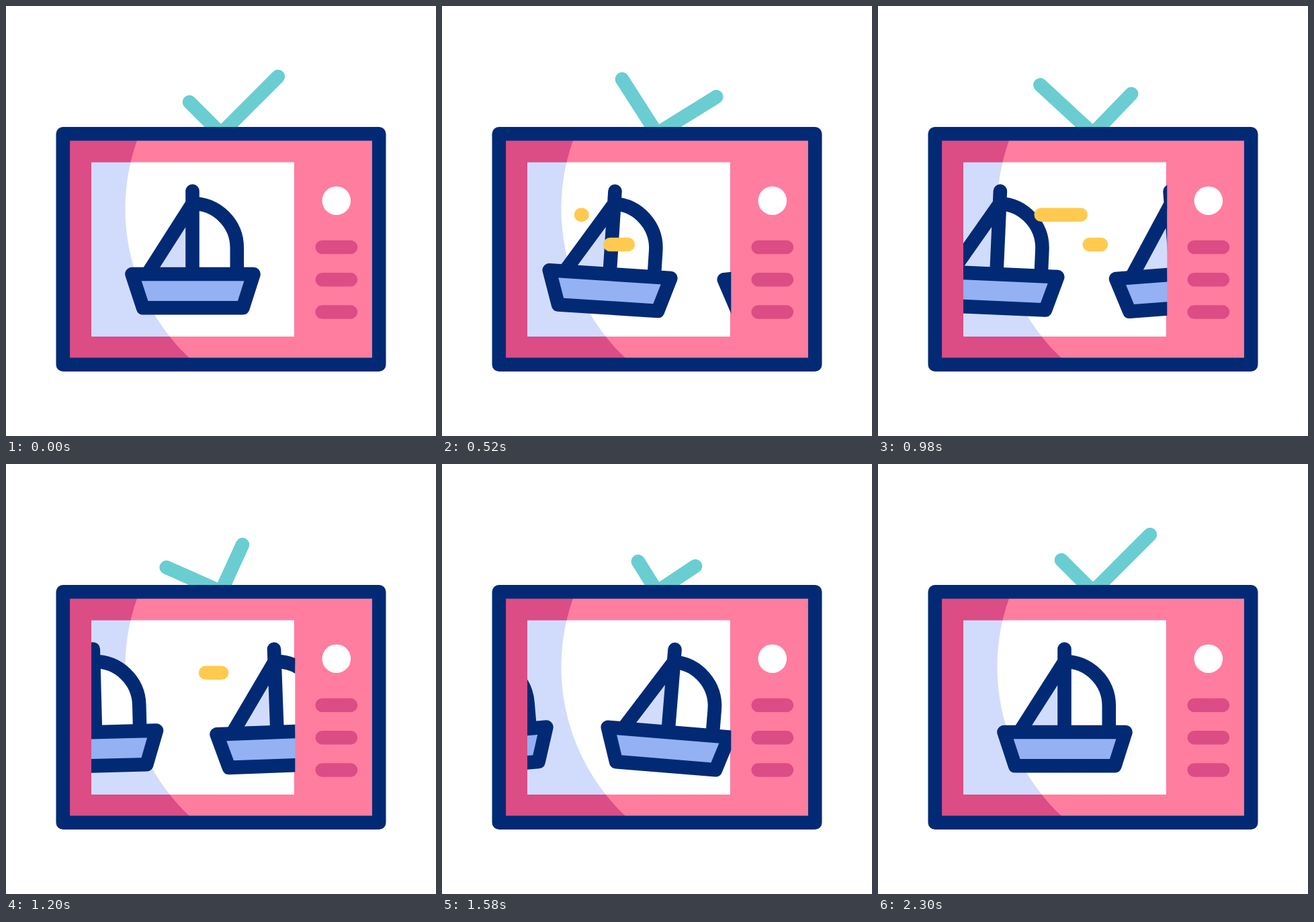
Write an HTML page that moves like this. It is 640 px wide and 640 px high and loops after 2400 ms.

```html
<!DOCTYPE html>
<html lang="en">
<head>
<meta charset="utf-8">
<title>Sailing on TV</title>
<style>
  html, body { margin: 0; width: 100%; height: 100%; overflow: hidden; background: #fff; }
  svg { display: block; width: 100vw; height: 100vh; }
  .line { fill: none; stroke-width: 20.6; stroke-linecap: round; stroke-linejoin: round; }
  .navy { stroke: #022a74; }
  .teal { stroke: #69cdd2; }
  .rose { stroke: #dc4c85; }
  .gold { stroke: #ffca4f; }
</style>
</head>
<body>
<svg viewBox="0 0 640 640">
  <defs>
    <clipPath id="screen"><rect x="127" y="233" width="303.3" height="259"/></clipPath>
    <clipPath id="lit"><circle cx="483.5" cy="302" r="306"/></clipPath>
    <g id="boat">
      <path d="M277.5 294 L210.5 399 H277.5Z" fill="#d1dcfd"/>
      <path d="M277.5 294 A66.3 66 0 0 1 343.8 360 V399 H277.5Z" fill="#fff"/>
      <path class="line navy" d="M277.5 275.5 V399 M277.5 294 L210.5 399 M277.5 294 A66.3 66 0 0 1 343.8 360 V399"/>
      <path class="line navy" d="M187.5 399 H368.5 L352.5 449.2 H204Z" style="fill:#93b1f3"/>
    </g>
  </defs>

  <line class="line teal" id="rodL" x1="320" y1="190"/>
  <line class="line teal" id="rodR" x1="320" y1="190"/>

  <rect x="85" y="190" width="470" height="344" fill="#dc4c85"/>
  <rect x="85" y="190" width="470" height="344" fill="#ff7d9f" clip-path="url(#lit)"/>
  <rect x="127" y="232.7" width="301.7" height="259.3" fill="#d1dcfd"/>
  <rect x="127" y="232.7" width="301.7" height="259.3" fill="#fff" clip-path="url(#lit)"/>
  <circle cx="491.8" cy="289.8" r="21.3" fill="#fff"/>
  <path class="line rose" d="M470.7 359 h42.2 M470.7 407.3 h42.2 M470.7 455.5 h42.2"/>

  <g clip-path="url(#screen)">
    <use id="boatA" href="#boat"/>
    <use id="boatB" href="#boat"/>
    <line class="line gold" id="gustLow" y1="355" y2="355"/>
    <line class="line gold" id="gustHigh" y1="310.7" y2="310.7"/>
  </g>

  <rect class="line navy" x="84.8" y="190.2" width="470.4" height="343.5"/>
</svg>
<script>
const LOOP = 2400;
const TIMES = [120, 280, 740, 1200, 1580, 1980, 2290];
const $ = id => document.getElementById(id);

// Smooth curve through the key poses, flat at every turning point
function track(...v) {
  const last = v.length - 1;
  const slope = i => (v[i + 1] - v[i]) / (TIMES[i + 1] - TIMES[i]);
  const tangent = v.map((_, i) => {
    if (i === 0 || i === last) return 0;
    const a = slope(i - 1), b = slope(i);
    return a * b > 0 ? 2 * a * b / (a + b) : 0;
  });
  return t => {
    if (t <= TIMES[0]) return v[0];
    if (t >= TIMES[last]) return v[last];
    const i = TIMES.findIndex(k => k > t) - 1;
    const span = TIMES[i + 1] - TIMES[i];
    const p = (t - TIMES[i]) / span, q = 1 - p;
    return q * q * (1 + 2 * p) * v[i] + p * p * (3 - 2 * p) * v[i + 1]
      + p * q * span * (q * tangent[i] - p * tangent[i + 1]);
  };
}

const rods = [
  { el: $('rodL'), angle: track(-45, -43, -25.7, -66, -32, -38, -45), size: track(66.5, 68.6, 118, 89, 53, 63, 66.5) },
  { el: $('rodR'), angle: track(45, 46.7, 66.3, 24.6, 56.3, 51.4, 45), size: track(120, 118, 89.6, 77, 68.5, 107, 120) }
];

const boats = [
  { el: $('boatA'), x: track(0, -6.2, -63, -143, -208.5, -252, -264), tilt: track(0, .6, 5.8, -1.5, -4.8, -3, 0) },
  { el: $('boatB'), x: track(264, 257, 210, 128, 55, 7.5, 0), tilt: track(-3, -4, -5.5, -2.1, 4.7, 1.8, 0) }
];

const gusts = [
  { el: $('gustLow'), from: 250, to: 332, start: 250 },
  { el: $('gustHigh'), from: 207, to: 321, start: 470 }
];
const GUST = 940;

// Sine ease from 0 to 1 between two moments
const ease = (t, a, b) => (1 - Math.cos(Math.PI * Math.min(1, Math.max(0, (t - a) / (b - a))))) / 2;

function draw(t) {
  for (const { el, angle, size } of rods) {
    const a = angle(t) * Math.PI / 180, r = size(t);
    el.setAttribute('x2', 320 + r * Math.sin(a));
    el.setAttribute('y2', 190 - r * Math.cos(a));
  }
  for (const { el, x, tilt } of boats) {
    el.setAttribute('transform', `translate(${x(t)} 0) rotate(${tilt(t)} 278 449)`);
  }
  for (const { el, from, to, start } of gusts) {
    const s = t - start;
    el.style.display = s > 0 && s < GUST ? '' : 'none';
    el.setAttribute('x1', from + (to - from) * ease(s, 250, GUST));
    el.setAttribute('x2', from + (to - from) * ease(s, 0, 700) + .01);
  }
}

const began = performance.now();
function tick() {
  draw((performance.now() - began) % LOOP);
  requestAnimationFrame(tick);
}
tick();
</script>
</body>
</html>
```
